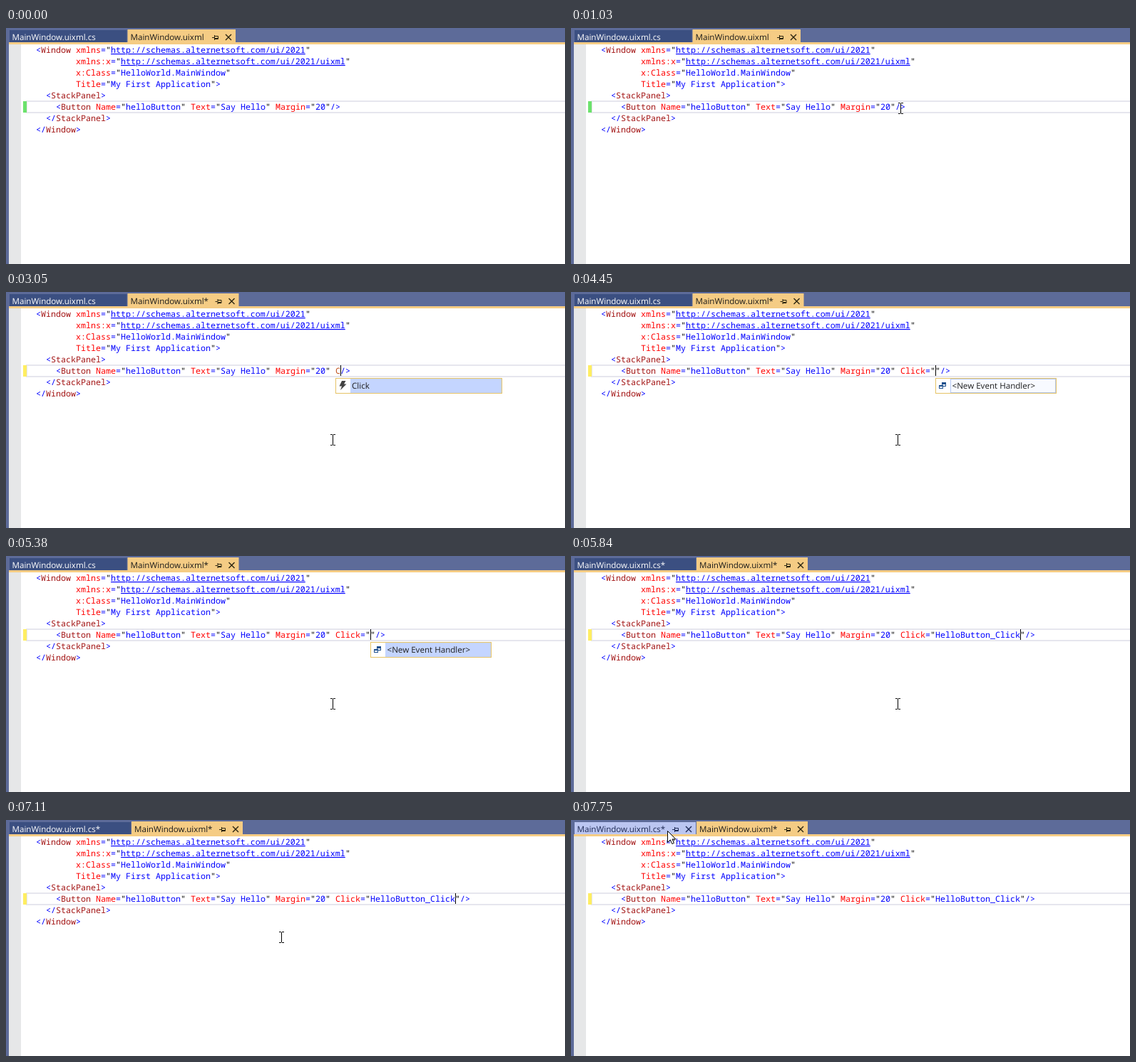
An HTML page that plays this animation: 784 by 332 pixels, repeating every 8 s.

```html
<!DOCTYPE html>
<html lang="en">
<head>
<meta charset="utf-8">
<title>Adding an event handler</title>
<style>
html, body { margin: 0; width: 100%; height: 100%; overflow: hidden; background: #fff; }
svg { display: block; width: 784px; height: 332px; }
text { white-space: pre; text-rendering: geometricPrecision; }
.code { font: 11.667px "Noto Sans Mono", "DejaVu Sans Mono", monospace; }
.link { text-decoration: underline; }
.ui { font: 11.6px "Open Sans", "Noto Sans", sans-serif; }
</style>
</head>
<body>
<svg id="stage" viewBox="0 0 784 332" width="784" height="332"></svg>
<script>
const LOOP = 8000;
const CHAR = 7, LEFT = 42, LINE = 16, BASE = 35;
const BLUE = '#0000ff', BROWN = '#a31515', RED = '#ff0000', BLACK = '#000';
const stage = document.getElementById('stage');

const esc = s => s.replace(/&/g, '&amp;').replace(/</g, '&lt;').replace(/>/g, '&gt;');
const rect = (x, y, w, h, fill, extra = '') =>
  `<rect x="${x}" y="${y}" width="${w}" height="${h}" fill="${fill}" ${extra}/>`;
const frame = (x, y, w, h, fill, stroke) =>
  rect(x + .5, y + .5, w - 1, h - 1, fill, `stroke="${stroke}"`);
const text = (x, y, s, fill, cls) =>
  `<text x="${x}" y="${y}" fill="${fill}" class="${cls}">${esc(s)}</text>`;
const path = (d, fill, stroke, width = 1) =>
  `<path d="${d}" fill="${fill}" stroke="${stroke}" stroke-width="${width}"/>`;
const at = (x, y, body) => `<g transform="translate(${x} ${y})">${body}</g>`;

// Code

function codeLine(src, row) {
  const y = BASE + row * LINE;
  const put = (col, s, fill, cls = '') => text(LEFT + col * CHAR, y, s, fill, 'code ' + cls);
  let out = '';
  for (const m of src.matchAll(/<\/?|\/?>|=|"([^"]*)"|[\w:]+/g)) {
    const [s, value] = m, i = m.index;
    if (s[0] === '"') {
      out += put(i, '"', BLACK) + put(i + s.length - 1, '"', BLACK);
      if (value) out += put(i + 1, value, BLUE, value.startsWith('http') ? 'link' : '');
    } else if (/^[<>=/]/.test(s)) {
      out += put(i, s, BLUE);
    } else {
      const element = /[<\/]/.test(src[i - 1] || '');
      const attribute = src[i + s.length] === '=';
      out += put(i, s, element ? BROWN : attribute ? RED : '#c0501c');
    }
  }
  return out;
}

const BUTTON = '    <Button Name="helloButton" Text="Say Hello" Margin="20"';

// [start time, typed text, caret offset inside it]
const TYPED = [
  [0, '', 0],
  [2240, ' ', 1],
  [2980, ' C', 2],
  [3310, ' Cl', 3],
  [3590, ' Cli', 4],
  [4120, ' Click=""', 8],
  [5840, ' Click="HelloButton_Click"', 25]
];
const CARET_ON = [[1310, 1840], [2240, 2710], [2980, 4850], [5380, 6440], [6970, 7500]];

function editor(t) {
  const [, typed, offset] = TYPED.filter(k => k[0] <= t).pop();
  const lines = [
    '<Window xmlns="http://schemas.alternetsoft.com/ui/2021"',
    '        xmlns:x="http://schemas.alternetsoft.com/ui/2021/uixml"',
    '        x:Class="HelloWorld.MainWindow"',
    '        Title="My First Application">',
    '  <StackPanel>',
    BUTTON + typed + '/>',
    '  </StackPanel>',
    '</Window>'
  ];
  let out = rect(4, 23, 780, 309, '#fff') + rect(4, 23, 17, 309, '#e6e7e8');
  out += rect(29, 103, 770, 16, 'none', 'stroke="#e6e6ee" stroke-width="2"');
  out += rect(24, 103, 5, 16, t < 2240 ? '#6ce26c' : '#ffee62');
  out += lines.map(codeLine).join('');
  if (CARET_ON.some(([a, b]) => t >= a && t < b))
    out += rect(LEFT + (BUTTON.length + offset) * CHAR, 103, 1, 15, BLACK);
  return out;
}

// Tabs

const pin = (x, color) => at(x, 13,
  path('M0 .5H3M3.5 -3V4M3.5 -1.5H8.5V2.5H3.5', 'none', color) + rect(4, 1, 4, 1, color));
const cross = (x, color) => at(x, 9, path('M0 0L8 8M8 0L0 8', 'none', color, 1.4));

function tabs(t, hover) {
  const edited = t >= 2240, added = t >= 5840;
  const x = added ? 176 : 170.5;
  const w = edited ? 156 : 151.5;
  const ink = '#2b2410', hoverInk = '#1e2a55';
  const first = 'MainWindow.uixml.cs' + (added ? '*' : '');
  let out = rect(0, 0, 784, 332, '#5d6b99');
  out += rect(5, 3, x - 6, 17, hover ? '#bbc6f1' : '#3b4f81');
  out += text(8.5, 17, first, hover ? hoverInk : '#fff', 'ui');
  if (hover) out += pin(142, hoverInk) + cross(161, hoverInk);
  out += rect(4, 20, 780, 3, '#f5cc84') + rect(x, 2, w, 21, '#f5cc84');
  out += text(x + 4, 17, 'MainWindow.uixml' + (edited ? '*' : ''), '#1a1a1a', 'ui');
  return out + pin(x + w - 33, ink) + cross(x + w - 14, ink);
}

// Completion lists

const bolt = at(467, 125, path('M4 0H9.5L7 4.5H10.5L2 13L4 7.5H.5Z', '#424242', 'none'));
const wrench = at(467, 126, path('M1 10L6 5M5.5 2.5A3 3 0 1 0 9.5 5.5', 'none', '#424242', 2));
const handler = at(516, 126,
  frame(4, 1, 6, 6, '#fff', '#1d4f8c') + rect(4, 1, 6, 3, '#1d4f8c') +
  frame(0, 5, 6, 5, '#fff', '#1d4f8c') + rect(0, 5, 6, 2, '#1d4f8c'));

const MEMBERS = ['Background', 'BorderBrush', 'Click', 'Enabled', 'Font',
  'Foreground', 'Height', 'IsDefault', 'Name'];

function memberList(names, selected) {
  let out = frame(462, 121, 234, 3 + 19 * names.length, '#fff', '#e5c365');
  names.forEach((name, i) => {
    const row = selected ? rect(483, 122, 212, 20, '#c4d5ff') : '';
    out += at(0, i * 19, row + (name === 'Click' ? bolt : wrench) +
      text(485, 136, name, '#1e1e1e', 'ui'));
  });
  return out;
}

function handlerList(selected) {
  const row = selected ? rect(532, 122, 148, 20, '#c4d5ff')
                       : frame(532, 122, 148, 20, '#f8faff', '#b5c9f5');
  return frame(511, 121, 170, 22, '#fff', '#e5c365') + row + handler +
    text(534.5, 136, '<New Event Handler>', '#1e1e1e', 'ui');
}

function popups(t) {
  if (t >= 2310 && t < 3050) return memberList(MEMBERS, false);
  if (t >= 3050 && t < 4120) return memberList(['Click'], true);
  if (t < 4400 || t >= 5840) return '';
  const tip = t >= 5050 && t < 5250
    ? frame(682, 122, 300, 23, '#f6f6f6', '#cccedb') +
      text(687, 137, 'Bind event to a newly created method', '#1e1e1e', 'ui')
    : '';
  return handlerList(t >= 5250) + tip;
}

// Pointer

// [start, end, from x, from y, to x, to y]
const MOVES = [
  [260, 1030, 699, 307, 462, 113],
  [1030, 1170, 462, 113, 452, 108],
  [1310, 1510, 452, 108, 458, 208],
  [6830, 7750, 458, 208, 135, 15]
];
const TICK = 70;
const ease = p => p * p * (3 - 2 * p);

function pointer(t) {
  const move = MOVES.filter(m => m[0] <= t).pop();
  if (!move) return null;
  const [a, b, x0, y0, x1, y1] = move;
  const time = t >= b ? b : a + Math.floor((t - a) / TICK) * TICK;
  const p = ease((time - a) / (b - a));
  return { x: Math.round(x0 + (x1 - x0) * p), y: Math.round(y0 + (y1 - y0) * p) };
}

const beam = path('M-3 -7.5H0M1 -7.5H4M.5 -7V7M-3 7.5H0M1 7.5H4', 'none', BLACK);
const arrow = path('M.5 .5V16.5L4.3 12.9L6.8 18.6L9.4 17.5L7 12H12Z', '#fff', BLACK);

let last = '';
function render(t) {
  const mouse = pointer(t);
  const hover = !!mouse && mouse.y < 20 && mouse.x < 175;
  let out = tabs(t, hover) + editor(t) + popups(t);
  if (mouse) out += at(mouse.x, mouse.y, mouse.y < 23 ? arrow : beam);
  if (out !== last) stage.innerHTML = last = out;
}

const start = performance.now();
function tick() {
  render((performance.now() - start) % LOOP);
  requestAnimationFrame(tick);
}
tick();
</script>
</body>
</html>
```
